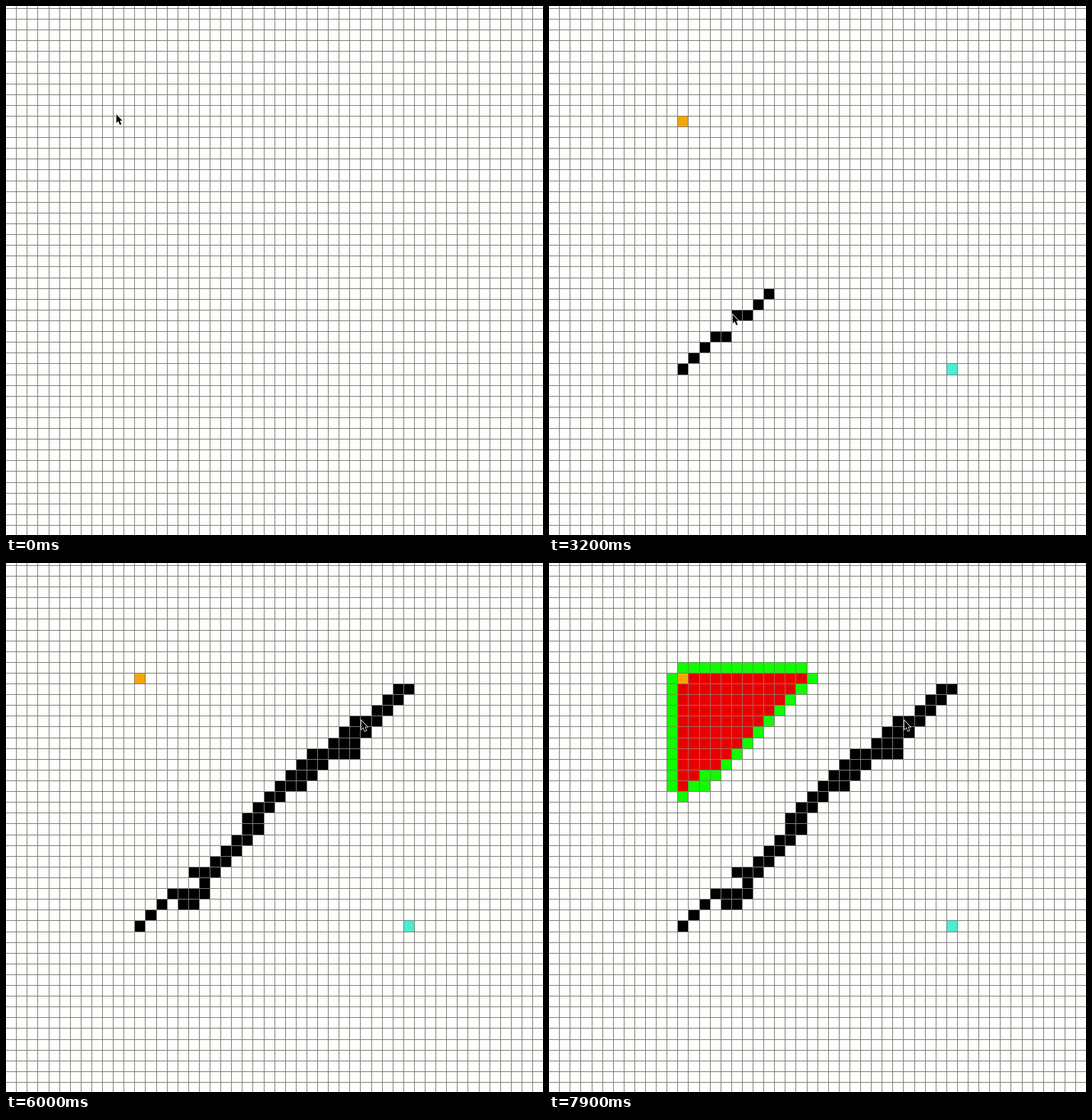
Animation of 754x742 px, one loop 8 s. Source, as an HTML page:

```html
<!DOCTYPE html>
<html lang="en">
<head>
<meta charset="utf-8">
<title>Grid path search</title>
<style>
  html, body { margin: 0; width: 100%; height: 100%; overflow: hidden; background: #fefefc; }
  svg { display: block; width: 100%; height: 100%; }
  #walls, #marks, #lines { shape-rendering: crispEdges; }
  #lines { fill: #7c7c77; }
  #tint { mix-blend-mode: color; opacity: .4; }
  #cursor { fill: #000; stroke: #fff; stroke-width: 1.6; paint-order: stroke; }
</style>
</head>
<body>
<svg viewBox="0 0 754 742">
  <g id="walls"></g>
  <g id="marks"></g>
  <path id="lines"/>
  <use id="tint" href="#marks"/>
  <path id="cursor" d="M0 0V12L2.8 9.5L4.9 14.8L7 13.9L4.9 8.7H8.2Z"/>
</svg>
<script>
const LOOP = 8000, STEP = 100;
const LEAD = 100; // walls appear this long before the pointer reaches them
const START = [12, 10], GOAL = [37, 33];
const COLORS = { start: '#f3a60b', goal: '#4beed0', wall: '#000', open: '#12fb00', closed: '#e60000' };

const toX = col => col * 15.1 - 0.35;
const toY = row => row * 15.106 + 3.4;
const lineX = col => Math.floor(toX(col));
const lineY = row => Math.floor(toY(row));
const byId = id => document.getElementById(id);

// The pointer's route in grid units; drawn parts leave walls behind
const route = [];
const parse = text => text.split(' ').map(pair => pair.split(',').map(Number));
const draw = (from, to, text) => route.push({ from, to, points: parse(text), pen: true });
const glide = (from, to, x, y) => {
  const last = route.length ? route[route.length - 1].points.slice(-1)[0] : [10.2, 9.4];
  route.push({ from, to, points: [last, [x, y]] });
};

glide(200, 400, 12.4, 9.6);
glide(1000, 1100, 15.7, 11.4);
glide(1200, 1600, 37, 33.4);
glide(2300, 2400, 21.4, 29.2);
glide(2400, 2700, 12, 33);
draw(2910, 3150, '12,33 15,30 16,30');
draw(3200, 3700, '17,28 18,28 22,24 22,23 26,19 27,19 27,18 28,17 32,17');
draw(4000, 4300, '32,17 32,15 33,15 34,14 34,13 36,11 37,11 36,12');
draw(4500, 4600, '36,12 35,13');
draw(4600, 5040, '29,18 28,18 28,19 27,20 26,20 23,23 23,24 18,29 18,30');
draw(5150, 5300, '17,30 17,31 16,31');
glide(5400, 5800, 30, 16);
draw(5800, 6000, '30,16 31,16 31,15 32,14 33,14');

const span = (a, b) => Math.max(Math.abs(b[0] - a[0]), Math.abs(b[1] - a[1]));

function lengthOf(points) {
  return points.slice(1).reduce((sum, p, i) => sum + span(points[i], p), 0);
}

function along(points, distance) {
  for (let i = 1; i < points.length; i++) {
    const a = points[i - 1], b = points[i], size = span(a, b);
    if (distance <= size) return a.map((v, axis) => v + (b[axis] - v) * distance / size);
    distance -= size;
  }
  return points[points.length - 1];
}

const walls = route.filter(part => part.pen).flatMap(({ from, to, points }) => {
  const total = lengthOf(points);
  return Array.from({ length: total + 1 }, (_, i) => ({
    pos: along(points, i),
    time: Math.round(from + (to - from) * i / total) - LEAD
  }));
});

function pointerAt(t) {
  const { from, to, points } = route.filter(part => part.from <= t).pop() || route[0];
  const part = Math.max(0, Math.min(1, (t - from) / (to - from)));
  const [col, row] = along(points, part * lengthOf(points));
  return [Math.round(toX(col + 0.1)), Math.round(toY(row + 0.43))];
}

const visitedAt = t => t < 6600 ? 0 : Math.round(5 + (t - 6600) * 0.0546);

// Cells are visited along diagonals, each from upper right to lower left
function searchCells(count) {
  const state = new Map();
  let depth = 0, down = 0;
  for (let i = 0; i < count; i++) {
    const x = START[0] + depth - down, y = START[1] + down;
    for (const [nx, ny] of [[x + 1, y], [x - 1, y], [x, y + 1], [x, y - 1]]) {
      const id = nx + ',' + ny;
      if (!state.has(id)) state.set(id, 'open');
    }
    state.set(x + ',' + y, i < count - 1 ? 'closed' : 'open');
    if (++down > depth) { depth++; down = 0; }
  }
  state.delete(START.join());
  return state;
}

function cell([x, y], kind) {
  const left = lineX(x), top = lineY(y);
  return `<rect x="${left}" y="${top}" width="${lineX(x + 1) - left}" height="${lineY(y + 1) - top}" fill="${COLORS[kind]}"/>`;
}

function render(t) {
  let marks = '';
  searchCells(visitedAt(t)).forEach((kind, id) => { marks += cell(id.split(',').map(Number), kind); });
  if (t >= 700) marks += cell(START, 'start');
  if (t >= 1800) marks += cell(GOAL, 'goal');
  byId('marks').innerHTML = marks;
  byId('walls').innerHTML = walls.filter(w => w.time <= t).map(w => cell(w.pos, 'wall')).join('');
  byId('cursor').setAttribute('transform', `translate(${pointerAt(t)})`);
}

let grid = '';
for (let k = 0; k < 50; k++) grid += `M${lineX(k)} 0h1v742h-1zM0 ${lineY(k)}h754v1h-754z`;
byId('lines').setAttribute('d', grid);

const begin = performance.now();
let shown = -1;
function tick() {
  const t = Math.floor((performance.now() - begin) % LOOP / STEP) * STEP;
  if (t !== shown) render(shown = t);
  requestAnimationFrame(tick);
}
tick();
</script>
</body>
</html>
```
